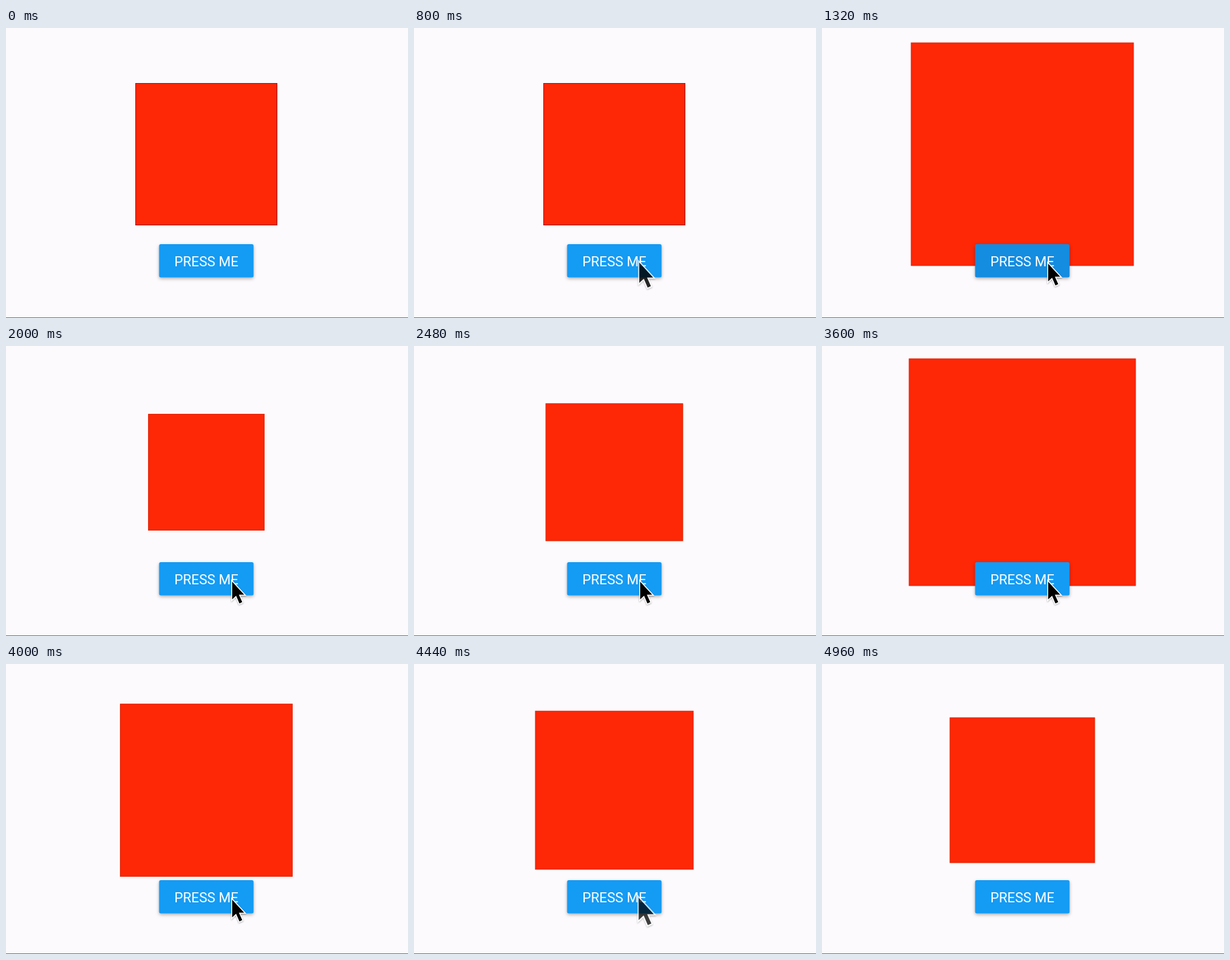
Recreate the animation shown at these times as an HTML page. Size 600x432 px, loop 5000 ms.

```html
<!DOCTYPE html>
<html lang="en">
<head>
<meta charset="utf-8">
<title>Spring button</title>
<style>
  html, body { margin: 0; width: 100%; height: 100%; overflow: hidden; background: #fcfafd; }
  svg { display: block; width: 100%; height: 100%; }
  #button { filter: drop-shadow(0 2px 2.5px rgba(0, 0, 0, .3)); }
  text { font: 20.4px Roboto, sans-serif; fill: #fff; text-anchor: middle; }
</style>
</head>
<body>
<svg viewBox="0 0 600 432">
  <rect width="600" height="432" fill="#fcfafd"/>
  <rect y="431" width="600" height="1" fill="#7d7c7e"/>
  <rect id="square" fill="#fe2706"/>
  <rect id="edge" fill="none" stroke="#5a1408"/>
  <rect id="button" x="228.5" y="322" width="141" height="49.5" rx="2.5"/>
  <text x="299" y="355">PRESS ME</text>
  <g id="cursor">
    <path d="M337.5 351V377.5L343.4 372L348.4 383.5L352.6 381.6L347.6 370.5H355.5Z"
      fill="#000" stroke="#fff" stroke-width="3" paint-order="stroke"
      style="filter: drop-shadow(0 1px 1px rgba(0, 0, 0, .3))"/>
  </g>
</svg>
<script>
const LOOP = 5000, SIZE = 212, CENTER = { x: 299, y: 188 };
const PRESSES = [1146, 3420];
const DAMPING = 2, FREQUENCY = 15.04;   // per second, underdamped spring
const [square, edge, button, cursor] =
  ['square', 'edge', 'button', 'cursor'].map(id => document.getElementById(id));

const ramp = (t, from, to) => Math.min(1, Math.max(0, (t - from) / (to - from)));
const pulse = (t, inAt, full, outAt, end) => ramp(t, inAt, full) * (1 - ramp(t, outAt, end));
const setAll = (el, attrs) => {
  for (const name in attrs) el.setAttribute(name, attrs[name]);
};

// Each press restarts the scale at 0 and lets it spring to 1.
function springScale(t) {
  const start = PRESSES.findLast(p => p <= t);
  if (start === undefined) return 1;
  const s = (t - start) / 1000, a = FREQUENCY * s;
  return 1 - Math.exp(-DAMPING * s) * (Math.cos(a) + DAMPING / FREQUENCY * Math.sin(a));
}

function placeSquare(el, size) {
  const side = Math.max(0, size);
  setAll(el, { x: CENTER.x - side / 2, y: CENTER.y - side / 2, width: side, height: side });
}

function draw(t) {
  const size = SIZE * springScale(t);
  placeSquare(square, size);
  placeSquare(edge, size - 1);
  edge.setAttribute('opacity', t < PRESSES[0] ? .6 : .2);

  const held = Math.max(pulse(t, 1000, 1100, 1400, 1600), pulse(t, 3260, 3340, 3430, 3570));
  button.setAttribute('fill', `rgb(20, ${155 - 15 * held}, ${244 - 20 * held})`);

  // The pointer shrinks into place, and leaves the same way.
  const shown = pulse(t, 360, 880, 4320, 4800);
  const zoom = 2 - shown;
  setAll(cursor, {
    opacity: shown,
    transform: `translate(346 362) scale(${zoom}) translate(-346 -362)`
  });
}

function frame(now) {
  draw(now % LOOP);
  requestAnimationFrame(frame);
}
frame(performance.now());
</script>
</body>
</html>
```
